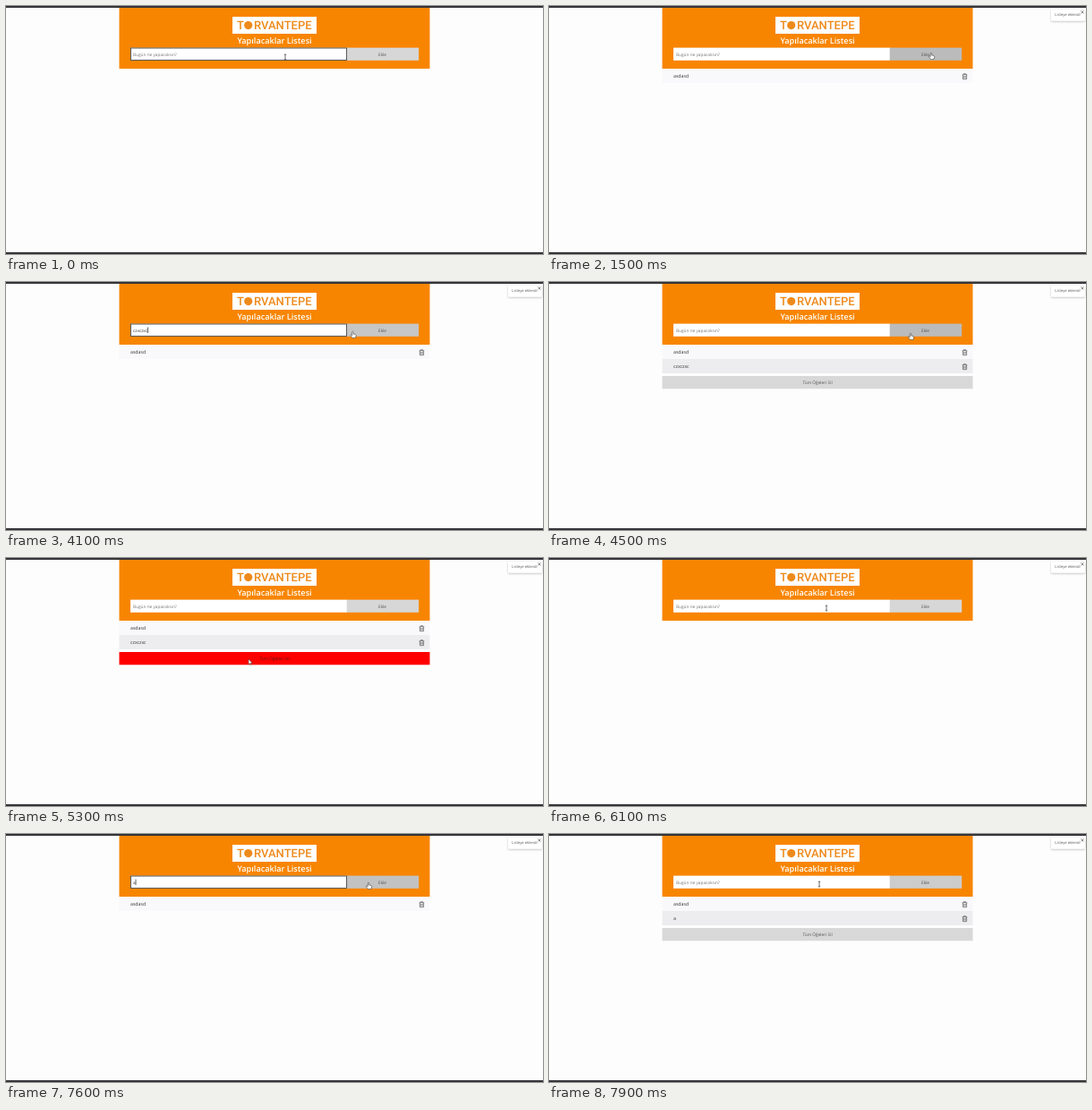
An HTML page that plays this animation: 600x277 px, repeating every 8 s.

```html
<!DOCTYPE html>
<html lang="tr">
<head>
<meta charset="utf-8">
<title>Yapılacaklar Listesi</title>
<style>
  html, body { margin: 0; height: 100%; overflow: hidden; background: #fefdfe; }
  svg { display: block; width: 600px; height: 277px; }
  text { font: 4.75px "Open Sans", "Noto Sans", sans-serif; fill: #555; text-rendering: geometricPrecision; }
  .mid { text-anchor: middle; }
  .title { font-size: 9.15px; font-weight: 600; fill: #fff; }
  .brand { font: 500 13px Roboto, sans-serif; fill: #ee8a1c; }
  .item { font-size: 5.2px; fill: #333; }
  .toast { font-size: 4.15px; fill: #555; }
  .line { fill: none; stroke: #555; stroke-width: .7; }
</style>
</head>
<body>
<svg viewBox="0 0 600 277">
  <defs>
    <path id="bin" class="line" d="M461.7 76.7h5.6M463.4 76.5v-.8h2.2v.8M462.4 77v4.7h4.2v-4.7M463.8 78v2.6M465.2 78v2.6"/>
    <filter id="soft" x="-20%" y="-40%" width="140%" height="200%">
      <feDropShadow dx="0" dy="1" stdDeviation="1.2" flood-opacity=".25"/>
    </filter>
  </defs>
  <rect width="600" height="277" fill="#fefdfe"/>
  <rect width="600" height="2" fill="#353438"/>
  <rect y="275" width="600" height="2" fill="#353438"/>

  <rect x="126.5" y="2" width="347" height="68" fill="#f88500"/>
  <rect x="253" y="12" width="94" height="19" fill="#fff"/>
  <text class="brand" x="258" y="26.3">T</text>
  <circle cx="270.7" cy="21.6" r="4.6" fill="#ee8a1c"/>
  <text class="brand" x="277" y="26.3">RVANTEPE</text>
  <text class="title mid" x="300" y="42">Yapılacaklar Listesi</text>

  <rect x="139" y="46.6" width="242" height="14.2" fill="#fff"/>
  <rect id="add" x="380.7" y="46.6" width="80.5" height="14.2"/>
  <text class="mid" x="420.5" y="55.6">Ekle</text>
  <rect id="ring" x="139.4" y="47" width="241.2" height="13.4" fill="none" stroke="#444" stroke-width=".9"/>
  <text id="hint" x="142" y="55.7" style="fill:#777">Bugün ne yapacaksın?</text>
  <text id="typed" x="142" y="55.7" style="fill:#333"></text>
  <rect id="caret" y="50.5" width=".7" height="6.5" fill="#222"/>

  <g id="row0">
    <rect x="126.5" y="70" width="347" height="16" fill="#f9f8fa"/>
    <text class="item" x="139" y="80">asdasd</text>
    <use href="#bin"/>
  </g>
  <g id="row1">
    <rect x="126.5" y="86" width="347" height="16" fill="#edecee"/>
    <text id="second" class="item" x="139" y="96"></text>
    <use href="#bin" y="16"/>
    <rect id="wipe" x="126.5" y="105" width="347" height="14.3"/>
    <text id="wipeText" class="mid" x="300" y="114">Tüm Öğeleri Sil</text>
  </g>

  <g id="toast">
    <rect x="561" y="4" width="38" height="12.5" rx="1" fill="#fff" filter="url(#soft)"/>
    <text class="toast" x="565.3" y="11.4">Listeye eklendi</text>
    <path class="line" d="M594.4 5.4l3 3m0-3l-3 3"/>
  </g>

  <g id="cursor">
    <path id="beam" d="M-1.2 -2.8h2.4M0 -2.8v5.6M-1.2 2.8h2.4" fill="none" stroke="#333" stroke-width=".7"/>
    <path id="arrow" d="M0 0v5.8l1.4-1.2 .9 2 .9-.4-.9-1.9h1.9z" fill="#fff" stroke="#222" stroke-width=".4"/>
    <path id="hand" d="M-.7 .6q.7-1 1.4 0v2.4l2.5 .6q.7.3.5 1.2l-.6 2.6h-3.7l-2.1-2.8q.1-1 1-.6l1 .7z" fill="#fff" stroke="#222" stroke-width=".5"/>
  </g>
</svg>
<script>
const el = id => document.getElementById(id);
const show = (id, on) => el(id).style.display = on ? '' : 'none';
const clamp = v => Math.max(0, Math.min(1, v));
const ramp = (t, from, ms) => clamp((t - from) / ms);
const pulse = (t, [on, off]) => ramp(t, on, 200) - ramp(t, off, 200);
const grey = v => `rgb(${v},${v},${v})`;

// time, x, y
const path = [
  [0, 312, 57], [100, 312, 57], [400, 320, 56], [1000, 320, 56],
  [1300, 427, 52], [1850, 427, 52], [2100, 302.5, 55], [3850, 302.5, 55],
  [4200, 408, 55], [4500, 404, 57], [4650, 386, 64], [5000, 300, 106],
  [5300, 271, 113], [5700, 271, 113], [6100, 310, 56], [6550, 310, 56],
  [6800, 398, 54], [6880, 398, 54], [7000, 379, 55], [7150, 330, 56],
  [7350, 330, 56], [7550, 405, 54], [7680, 405, 54], [7900, 302, 56], [8000, 302, 56]
];
// focus start, submit, first key, key interval, text, caret phase
const entries = [
  [0, 1300, 100, 120, 'asdasd', 500],
  [2890, 4250, 3700, 45, 'czxczxc', 0],
  [6150, 6850, 6200, 60, 'asdasd', 0],
  [7150, 7650, 7300, 50, 'a', 0]
];
const addHover = [[1120, 1930], [3980, 4640], [6700, 7010], [7450, 7780]];
const wiped = 5700;

function place(t) {
  const i = path.findIndex(k => k[0] > t);
  const [t0, x0, y0] = path[i - 1], [t1, x1, y1] = path[i];
  const p = (t - t0) / (t1 - t0), e = p * p * (3 - 2 * p);
  return [x0 + (x1 - x0) * e, y0 + (y1 - y0) * e];
}

function drawInput(t) {
  const entry = entries.find(e => t >= e[0] && t < e[1]);
  let text = '', blink = false;
  if (entry) {
    const [start, , first, step, word, phase] = entry;
    if (t >= first) text = word.slice(0, Math.floor((t - first) / step) + 1);
    blink = (t - start + phase) % 1000 < 500;
  }
  show('ring', entry);
  show('hint', !text);
  show('caret', blink);
  el('typed').textContent = text;
  el('caret').setAttribute('x', 142 + (text ? el('typed').getComputedTextLength() : 0));
}

function drawList(t) {
  const [first, second, third, fourth] = entries.map(e => e[1]);
  show('row0', t >= first && t < wiped || t >= third);
  show('row1', t >= second && t < wiped || t >= fourth);
  el('second').textContent = t < wiped ? 'czxczxc' : 'a';
  const red = t < wiped ? ramp(t, 4970, 200) : 0;
  const dim = 216 * (1 - red);
  el('wipe').setAttribute('fill', `rgb(${216 + 39 * red},${dim},${dim})`);
  el('wipeText').style.fill = `rgb(85,${85 - 60 * red},${85 - 60 * red})`;
  el('toast').style.opacity = ramp(t, first, 150);
}

function drawCursor(t) {
  const [x, y] = place(t);
  const inBar = y > 46 && y < 61;
  const hand = inBar && x > 378 && x < 461;
  const beam = inBar && x > 139 && x <= 378;
  show('hand', hand);
  show('beam', beam);
  show('arrow', !hand && !beam);
  el('cursor').setAttribute('transform', `translate(${x} ${y})`);
}

function frame(now) {
  const t = now % 8000;
  const hover = addHover.reduce((sum, span) => sum + pulse(t, span), 0);
  el('add').setAttribute('fill', grey(215 - 28 * hover));
  drawInput(t);
  drawList(t);
  drawCursor(t);
  requestAnimationFrame(frame);
}
requestAnimationFrame(frame);
</script>
</body>
</html>
```
